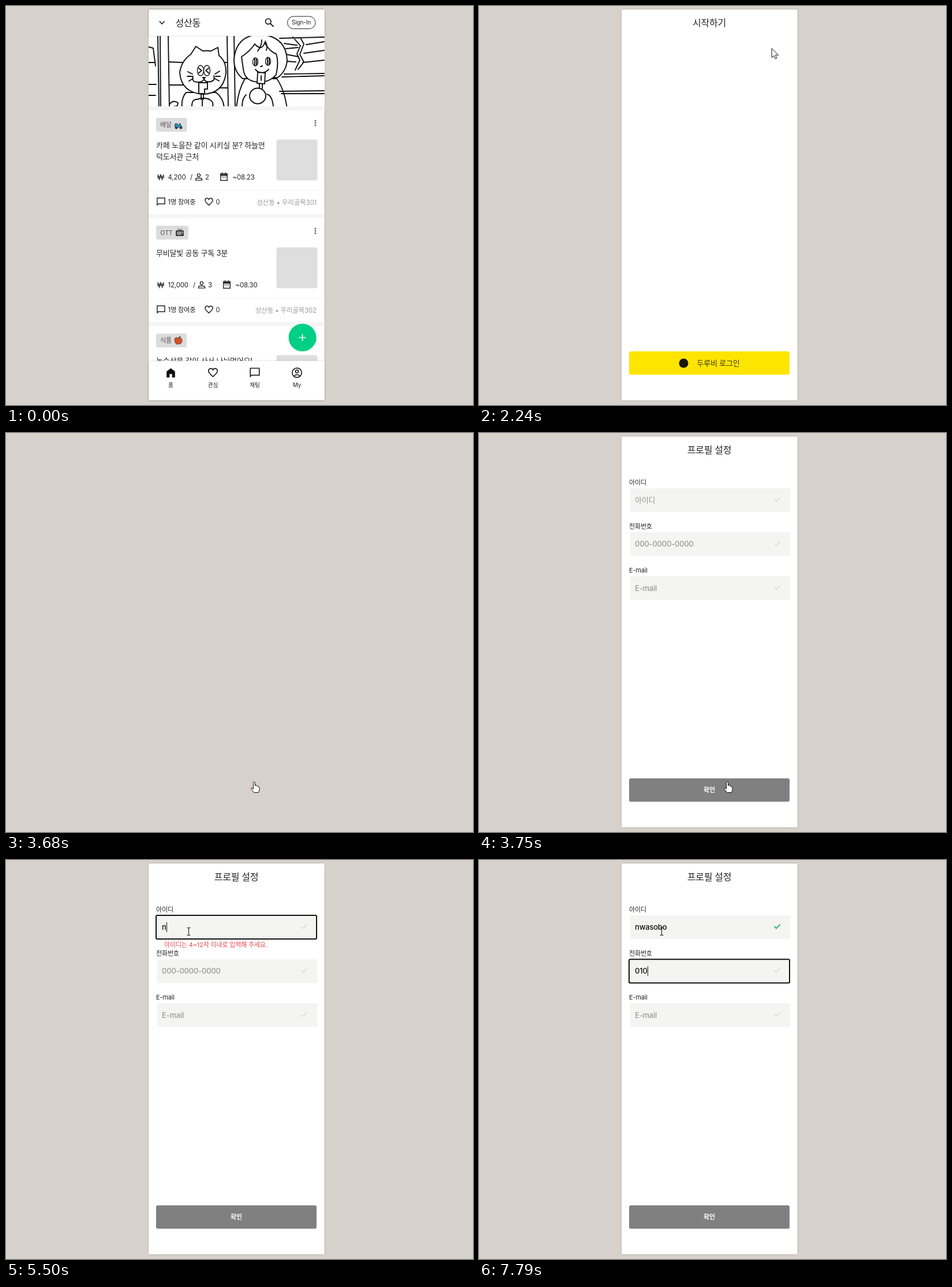
An HTML page for the animation above (8 s loop, 809 by 692 pixels).

```html
<!DOCTYPE html>
<html lang="ko">
<head>
<meta charset="utf-8">
<style>
html, body { margin: 0; width: 100%; height: 100%; overflow: hidden; background: #d6d1ca; }
svg { display: block; width: 100vw; height: 100vh; }
text { font-family: Inter, "Noto Sans CJK KR", "Noto Sans CJK", sans-serif; letter-spacing: -.015em; white-space: pre; }
.line { fill: none; stroke: #222; stroke-width: 2; }
</style>
</head>
<body>
<svg id="stage" viewBox="0 0 809 692"></svg>
<script>
const LOOP = 8000;
const DARK = '#222';

const text = (x, cy, str, size, { fill = DARK, weight = 400, anchor = 'start', id = '' } = {}) =>
  `<text ${id && `id="${id}"`} x="${x}" y="${cy + size * 0.365}" font-size="${size}" fill="${fill}" font-weight="${weight}" text-anchor="${anchor}">${str}</text>`;
const rect = (x, y, w, h, fill, r = 0, extra = '') =>
  `<rect x="${x}" y="${y}" width="${w}" height="${h}" rx="${r}" fill="${fill}" ${extra}/>`;
const path = (d, extra = 'class="line"') => `<path d="${d}" ${extra}/>`;
const ellipse = (cx, cy, rx, ry, extra = '') => `<ellipse cx="${cx}" cy="${cy}" rx="${rx}" ry="${ry}" ${extra}/>`;
const group = (id, body) => `<g id="${id}">${body}</g>`;

// Icons live in a 24 unit box centred on the given point.
const icons = {
  chat: path('M3 19.5V3H21V17H5.5Z'),
  heart: path('M12 20C6 14.8 3 12 3 8.5A4.7 4.7 0 0 1 12 6.4A4.7 4.7 0 0 1 21 8.5C21 12 18 14.8 12 20Z'),
  person: path('M12 4a3.7 3.7 0 1 1 0 7.4a3.7 3.7 0 1 1 0-7.4M4 20v-2q0-3.5 8-3.5t8 3.5v2Z'),
  calendar: path('M4 5H20V21H4ZM4 7.5H20M4 9H20M8 1.5V5M16 1.5V5') + path('M7 12h2v2H7zm4 0h2v2h-2zm4 0h2v2h-2z', 'fill="#222"'),
  won: path('M3.5 4L7.5 20L12 5L16.5 20L20.5 4M1.5 10H22.5M1.5 14H22.5'),
  home: path('M3.5 9.5L12 3L20.5 9.5V21.5H14.5V14.5H9.5V21.5H3.5Z', 'fill="#111"'),
  account: path('M12 2.5a9.5 9.5 0 1 1 0 19a9.5 9.5 0 1 1 0-19M12 6.5a3 3 0 1 1 0 6a3 3 0 1 1 0-6M5.5 18.8q6.5-5.6 13 0'),
};
const icon = (name, cx, cy, s) => `<g transform="translate(${cx - 12 * s} ${cy - 12 * s}) scale(${s})">${icons[name]}</g>`;

const emoji = {
  scooter: (x, y) => ellipse(x + 3, y + 10, 2.4, 2.4, 'fill="#333"') + ellipse(x + 11, y + 10, 2.4, 2.4, 'fill="#333"')
    + path(`M${x} ${y + 8}L${x + 1} ${y + 3}H${x + 5}L${x + 7} ${y + 7}L${x + 9} ${y + 2}L${x + 13} ${y + 9}H${x + 8}L${x + 6} ${y + 10}Z`, 'fill="#2f8fc4" stroke="#234" stroke-width=".8"'),
  tv: (x, y) => path(`M${x + 3} ${y - 1}L${x + 7} ${y + 2}L${x + 11} ${y - 1}`, 'class="line" style="stroke-width:1"')
    + rect(x, y + 2, 14, 10, '#3c3833', 1.5) + rect(x + 2, y + 4, 8, 6, '#8c9b94', 1) + rect(x + 11, y + 4, 1.5, 4, '#bbb'),
  apple: (x, y) => path(`M${x + 6} ${y + 2}Q${x} ${y - 1} ${x} ${y + 6}Q${x + 2} ${y + 15} ${x + 7} ${y + 12}Q${x + 13} ${y + 13} ${x + 13} ${y + 5}Q${x + 12} ${y} ${x + 6} ${y + 2}`, 'fill="#d4512c" stroke="#6b2a1a" stroke-width=".8"')
    + path(`M${x + 6} ${y + 2}Q${x + 7} ${y - 2} ${x + 11} ${y - 1}Q${x + 10} ${y + 2} ${x + 6} ${y + 2}`, 'fill="#4b7a38"'),
};

function banner() {
  const ink = d => path(d, 'fill="none" stroke="#111" stroke-width="1.9" stroke-linejoin="round" stroke-linecap="round"');
  const shape = 'fill="#fff" stroke="#111" stroke-width="1.9"';
  const thin = 'fill="#fff" stroke="#111" stroke-width="1.4"';
  return `<g clip-path="url(#bannerClip)">` + rect(247, 52, 305, 122, '#fff')
    + ink('M263 50L265 176M267 50L268 176M281 50L283 176M247 71L255 73L259 104M247 98H258M247 136H260M247 155H259M283 97L306 98M283 137H312M283 171Q289 162 298 168Q297 176 292 174')
    + ink('M383 50L385 176M395 50L397 176M370 142H384M364 98H384')
    // cat
    + path('M312 150Q303 160 305 178H378Q377 160 364 150Z', shape)
    + path('M320 84L329 70L341 78Q348 77 355 78L367 72L369 86Q382 96 381 117Q376 152 341 153Q303 150 301 115Q304 95 320 84Z', shape)
    + ellipse(337, 112, 5.5, 9, thin) + ellipse(348, 112, 5.5, 9, thin)
    + ink('M334 108L339 112L334 116M351 108L346 112L351 116M341 124H345L343 126ZM324 122Q321 132 332 132Q341 132 343 127Q346 133 355 131Q363 129 360 121')
    + ink('M315 114L323 118M314 122H323M317 130L324 126M362 118L370 113M363 122L371 122M362 126L369 130')
    + path('M334 133H349V144H344V152H334Z', shape) + ink('M338 152V162M342 152V162M322 174Q322 161 331 162L338 160Q347 159 354 163Q360 167 358 174M340 162V174')
    // child
    + path('M414 126Q402 146 399 178H487Q482 144 469 126Z', shape)
    + path('M410 126Q395 114 395 93Q398 53 437 49Q485 51 487 94Q486 112 471 124Z', shape)
    + path('M408 88Q422 79 431 66Q443 79 448 64Q458 80 468 83Q473 96 468 119Q457 132 440 132Q413 132 411 109Z', shape)
    + ink('M436 78Q443 70 443 59M451 77Q454 70 449 61')
    + ellipse(432, 97, 4.5, 7, thin) + ellipse(454, 96, 4.5, 7, thin)
    + ink('M431 91V103M434 92V102M453 90V102M456 91V101M441 105L444 104M432 110Q443 122 455 110')
    + path('M436 115L449 116L448 135L435 134Z', shape) + ink('M442 121V129M439 135V143M444 135V143')
    + ellipse(436, 156, 14, 13.5, shape) + ink('M452 153Q461 155 463 174M416 154Q409 160 409 174')
    // shelf
    + ink('M474 56L551 54M482 65L504 68M520 67L551 62M485 74L506 72M486 84L507 88M516 82L551 77M487 96L502 97M514 98L551 94M497 54L510 69L504 83L509 94L501 111M510 55L516 66L509 84L516 97L506 110')
    + ink('M482 118L551 117M478 123L551 121M474 148L551 147M477 152L551 152')
    + '</g>';
}

function card(y, { tag, tagWidth, art, lines, price, shift = 0, people, due, author }) {
  const gray = { fill: '#9b9b9b', anchor: 'end' };
  return rect(247, y - 7, 305, 7, '#f5f5f5')
    + rect(260, y + 13, tagWidth, 24, '#dcdcdc', 3) + text(267, y + 25, tag, 11, { fill: '#555' }) + art
    + [18, 22, 26].map(d => ellipse(536, y + d, 1.5, 1.5, 'fill="#666"')).join('')
    + rect(468.5, y + 50.5, 71, 71, '#dedede', 4)
    + lines.map((s, i) => text(260, y + 60 + i * 20.5, s, 13)).join('')
    + icon('won', 268, y + 115.5, 0.58) + text(280.5, y + 115.5, price, 11.5)
    + text(319 + shift, y + 115.5, '/', 11.5) + icon('person', 334 + shift, y + 115.5, 0.7) + text(345 + shift, y + 115.5, people, 11.5)
    + icon('calendar', 377.5 + shift, y + 115, 0.72) + text(392.5 + shift, y + 115.5, due, 11.5)
    + rect(247, y + 138, 305, 1, '#f5f5f5')
    + icon('chat', 268.5, y + 158.5, 0.73) + text(280.5, y + 158.5, '1명 참여중', 11.2)
    + icon('heart', 351.5, y + 158.5, 0.73) + text(363.5, y + 158.5, '0', 11.2)
    + text(538, y + 160, '성산동 • ' + author, 11.5, gray);
}

function home() {
  const nav = [['home', 285.5, '홈'], ['heart', 358.5, '관심'], ['chat', 431, '채팅'], ['account', 504, 'My']];
  return banner()
    + card(181, { tag: '배달', tagWidth: 53.5, art: emoji.scooter(292, 201), lines: ['카페 노을잔 같이 시키실 분? 하늘언', '덕도서관 근처'],
      price: '4,200', people: '2', due: '~08.23', author: '우리골목301' })
    + card(368, { tag: 'OTT', tagWidth: 56, art: emoji.tv(294, 387), lines: ['무비달빛 공동 구독 3분'],
      price: '12,000', shift: 5, people: '3', due: '~08.30', author: '우리골목302' })
    + `<g clip-path="url(#listClip)">` + card(555, { tag: '식품', tagWidth: 53, art: emoji.apple(292, 574), lines: ['농수산물 같이 사서 나눠먹어요!'],
      price: '', people: '', due: '', author: '' }) + '</g>'
    + rect(247, 6, 305, 45.5, '#fff', 0, 'filter="url(#soft)"')
    + path('M265.8 26.5L270.2 31L274.6 26.5', 'class="line" style="stroke-width:1.7"')
    + text(293.5, 29, '성산동', 16, { weight: 500 })
    + `<circle cx="454.3" cy="26.8" r="4.7" class="line" style="stroke-width:1.8"/>` + path('M457.8 30.3L463.6 36')
    + rect(487.5, 18, 48.5, 21.5, '#fff', 10.75, 'stroke="#222"')
    + text(511.5, 28.5, 'Sign-In', 10, { anchor: 'middle' })
    + ellipse(513.5, 575, 24, 24, 'fill="#02cf86"') + path('M507.5 575H519.5M513.5 569V581', 'stroke="#fff" stroke-width="1.7"')
    + rect(247, 615.5, 305, 68.5, '#fff', 0, 'filter="url(#soft)"')
    + nav.map(([name, x, label]) => icon(name, x, 636, 0.86) + text(x, 657, label, 9.7, { anchor: 'middle' })).join('');
}

function start() {
  return text(399, 29, '시작하기', 16, { weight: 500, anchor: 'middle' })
    + rect(260, 599, 278, 40.5, '#fee500', 3)
    + ellipse(354.5, 619.5, 8, 8, 'fill="#1a1600"')
    + text(414.5, 619, '두루비 로그인', 13, { fill: '#3a3415', anchor: 'middle' });
}

const tick = 'M511.5 115.2L515 118.6L521.7 111.6';
function field(i, label, hint) {
  const y = 96 + i * 76.2;
  return text(260, y - 10.5, label, 11)
    + rect(261.5, y, 278, 41, '#f4f4f3', 2, `id="box${i}"`)
    + text(270, y + 20.5, hint, 13, { fill: '#999', weight: 500, id: 'value' + i })
    + `<path id="tick${i}" d="${tick}" transform="translate(0 ${i * 76.2})" fill="none" stroke="#ddd" stroke-width="1.8"/>`;
}

function profile() {
  return text(399, 29, '프로필 설정', 16, { weight: 500, anchor: 'middle' })
    + field(0, '아이디', '아이디') + field(1, '전화번호', '000-0000-0000') + field(2, 'E-mail', 'E-mail')
    + text(274, 147, '아이디는 4~12자 이내로 입력해 주세요.', 11, { fill: '#e5484d', id: 'warning' })
    + rect(0, 0, 1, 17, '#111', 0, 'id="caret"')
    + rect(260, 599, 278, 40.5, '#808080', 3)
    + text(399, 619, '확인', 11, { fill: '#fff', weight: 700, anchor: 'middle' });
}

const pointer = 'fill="#fff" stroke="#111" stroke-linejoin="round"';
document.getElementById('stage').innerHTML = `<defs>
  <clipPath id="bannerClip"><rect x="247" y="52" width="305" height="122"/></clipPath>
  <clipPath id="listClip"><rect x="247" y="548" width="305" height="68"/></clipPath>
  <filter id="soft" x="-5%" y="-20%" width="110%" height="140%"><feDropShadow dx="0" dy="0" stdDeviation="1.3" flood-opacity=".3"/></filter>
  </defs>` + rect(0, 0, 809, 692, '#d6d1ca')
  + group('phone', rect(247, 6, 304.5, 678, '#fff', 0, 'filter="url(#soft)"') + group('home', home()) + group('start', start()) + group('profile', profile()))
  + `<circle id="glow" r="10.5" fill="#fff22e" opacity=".72"/>`
  + group('cursor',
    path('M0 0V16L3.7 12.6L6.2 18.2L8.8 17.1L6.3 11.6H11.5Z', `id="arrow" ${pointer}`)
    + path('M-1.5 1.5a1.5 1.5 0 0 1 3 0V7l.3-1.2q1.3-.8 2.4.4l.2 1q1.4-.8 2.4.5l.2 1q1.6-.4 2 1.2V14l-1.5 4.5h-8L-5 12.5q-1-2 .6-2.2l2.9 2z', `id="hand" ${pointer}`)
    + path('M-3 -6.5H-1L0 -5.5L1 -6.5H3M0 -5.5V5.5M-3 6.5H-1L0 5.5L1 6.5H3', 'id="beam" fill="none" stroke="#222" stroke-width="1.2"'));

const $ = id => document.getElementById(id);
const show = (id, on) => { $(id).style.display = on ? '' : 'none'; };
const between = (t, a, b) => t >= a && t < b;

// begin, end, steps, from, bend, to
const moves = [
  [320, 1100, 12, [775, 700], [432, 300], [512, 41]],
  [1170, 1370, 3, [512, 41], [512, 36], [513.5, 31.5]],
  [2100, 2880, 12, [513.5, 31.5], [470, 315], [429, 604]],
  [2950, 3020, 2, [429, 604], [429, 604], [430, 605]],
  [4010, 4430, 7, [430, 605], [385, 350], [316.5, 124]],
];

function cursorAt(t) {
  const [a, b, n, from, bend, to] = moves.filter(m => t >= m[0]).pop() || moves[0];
  const step = Math.min(n, Math.floor((t - a) / (b - a) * (n - 1) + 1.001));
  const p = Math.max(0, step / n);
  const k = p * p * (3 - 2 * p);
  return [0, 1].map(i => (1 - k) ** 2 * from[i] + 2 * k * (1 - k) * bend[i] + k * k * to[i]);
}

const typed = (str, times, t) => str.slice(0, times.filter(at => t >= at).length);
const idTimes = [5430, 5850, 5980, 6050, 6320, 6450, 6580];
const phoneTimes = [7530, 7660, 7790];

function setValue(i, value, hint) {
  const el = $('value' + i);
  el.textContent = value || hint;
  el.setAttribute('fill', value ? '#111' : '#999');
  return value ? el.getComputedTextLength() : 0;
}

function render(t) {
  show('phone', !between(t, 3680, 3750));
  show('home', t < 1700);
  show('start', between(t, 1700, 3680));
  show('profile', t >= 3750);

  const [x, y] = cursorAt(t);
  const overButton = between(t, 1300, 1770) || (t > 2800 && y >= 599);
  const overField = t > 4010 && y < 137;
  show('cursor', t >= 320);
  show('hand', overButton);
  show('beam', overField);
  show('arrow', !overButton && !overField);
  $('cursor').setAttribute('transform', `translate(${x} ${y})`);
  const pressed = between(t, 1630, 1770) || between(t, 3280, 3410) || between(t, 4500, 4630);
  show('glow', pressed);
  $('glow').setAttribute('cx', x);
  $('glow').setAttribute('cy', y + 1.5);

  if (t < 3750) return;
  const focus = t < 4500 ? -1 : t < 6980 ? 0 : 1;
  for (let i = 0; i < 3; i++) {
    const on = i === focus;
    const box = $('box' + i);
    box.setAttribute('x', on ? 260 : 261.5);
    box.setAttribute('stroke', on ? '#111' : 'none');
    box.setAttribute('stroke-width', 2);
  }
  const widths = [
    setValue(0, typed('nwasobo', idTimes, t), '아이디'),
    setValue(1, typed('010', phoneTimes, t), '000-0000-0000'),
  ];
  $('tick0').setAttribute('stroke', t >= 6120 ? '#20b15c' : '#ddd');
  show('warning', between(t, 5500, 6120));
  show('caret', focus >= 0 && !between(t, 5030, 5430));
  if (focus >= 0) {
    $('caret').setAttribute('x', 270 + Math.round(widths[focus]));
    $('caret').setAttribute('y', 108 + focus * 76);
  }
}

function loop() {
  render(performance.now() % LOOP);
  requestAnimationFrame(loop);
}
loop();
</script>
</body>
</html>
```
